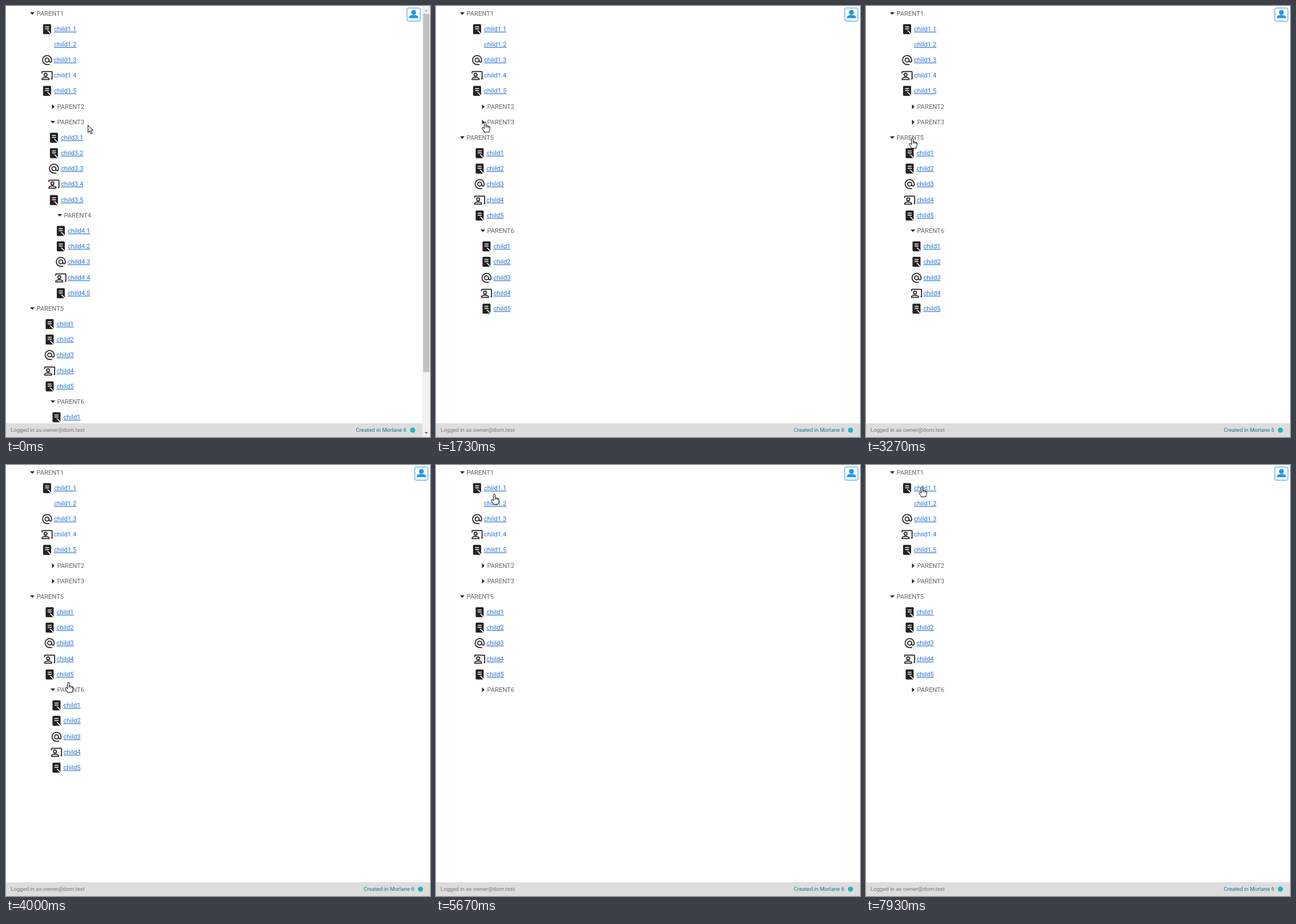
These frames come from a looping animation (742 px wide and 754 px high, 8000 ms). An HTML page:

```html
<!DOCTYPE html>
<html lang="en">
<head>
<meta charset="utf-8">
<title>Collapsible tree</title>
<style>
  html, body { margin: 0; width: 100%; height: 100%; overflow: hidden; background: #fff; }
  svg { display: block; width: 742px; height: 754px; }
  text { font: 11.2px Roboto, Arial, sans-serif; fill: #666; }
  .link { fill: #2a73d2; text-decoration: underline; }
  .plain { text-decoration: none; }
  .small { font-size: 9.6px; fill: #777; }
  .credit { fill: #16788f; }
  .ink { fill: #212121; }
  .line { fill: none; stroke: #212121; stroke-width: 2; }
  .gap { fill: none; stroke: #fff; stroke-width: 1.8; }
  .cursor { fill: #fff; stroke: #000; stroke-width: 1; stroke-linejoin: round; }
</style>
</head>
<body>
<svg viewBox="0 0 742 754" xmlns="http://www.w3.org/2000/svg">
  <defs>
    <g id="page">
      <path class="ink" d="M6 2H18a2 2 0 0 1 2 2V22H6a2 2 0 0 1-2-2V4a2 2 0 0 1 2-2Z"/>
      <path class="gap" d="M8 7.5H16M8 11.5H16M12.5 15.2Q14.5 15.4 15.5 17L20.5 22.5"/>
    </g>
    <g id="at" class="line">
      <circle cx="12" cy="12" r="4"/>
      <path d="M17 21H12A9 9 0 1 1 21 12V13.5A2.5 2.5 0 0 1 16 13.5V12"/>
    </g>
    <g id="present" class="line">
      <path d="M2 8V5A1 1 0 0 1 3 4H21A1 1 0 0 1 22 5V19H20"/>
      <circle cx="9" cy="10.5" r="3"/>
      <path d="M2 20V18.8C2 16.8 6.5 15.8 9 15.8S16 16.8 16 18.8V20Z"/>
    </g>
  </defs>

  <g id="tree"></g>

  <rect y="730" width="742" height="24" fill="#ddd"/>
  <text class="small" x="8" y="745.4">Logged in as owner@dom.test</text>

  <g id="right">
    <rect x="715.4" y="3.5" width="23" height="23" rx="2.5" fill="#fff" stroke="#2196f3"/>
    <circle cx="727" cy="11.3" r="4.2" fill="#2196f3"/>
    <path d="M719 21.2V19.6C719 17.2 723 15.8 727 15.8S735 17.2 735 19.6V21.2Z" fill="#2196f3"/>
    <text class="small credit" x="626" y="745.4">Created in Morlane 6</text>
    <circle cx="725.3" cy="742" r="4.5" fill="#25b3c6"/>
  </g>

  <g id="bar">
    <rect x="728.6" width="13.4" height="754" fill="#f1f1f1"/>
    <rect x="730" y="13.5" width="11" height="627" fill="#c1c1c1"/>
    <path d="M732.5 9L735.3 6 738.1 9Z" fill="#a3a3a3"/>
    <path d="M732.5 745.5L735.3 748.5 738.1 745.5Z" fill="#505050"/>
  </g>

  <path id="arrow" class="cursor" d="M.5.5V13.5L3.4 10.7 5.5 15.6 7.6 14.7 5.5 9.9H9.6Z"/>
  <g id="hand" class="cursor">
    <path d="M-1.5 1.5a1.5 1.5 0 0 1 3 0V6.6q1.5-.8 2.6.4 1.5-.6 2.4.6 1.6-.3 1.7 1.4V12.6q0 1.8-1.2 3.4V17.8H-1.8V16.3L-5.2 11.4q-.7-1.7.6-2.1 1.2-.2 3.1 2.1Z"/>
    <path fill="none" d="M1.5 6.6V9.6M4.1 7V9.8M6.5 7.6V10"/>
  </g>
</svg>
<script>
const LOOP = 8000, FPS = 15, PITCH = 27.18;
const $ = id => document.getElementById(id);
const rows = [];

function addRow(html, inside) {
  const el = document.createElementNS("http://www.w3.org/2000/svg", "g");
  el.innerHTML = html;
  $("tree").append(el);
  const row = { el, inside };
  rows.push(row);
  return row;
}

function parent(id, x, inside = []) {
  const row = addRow(`<path class="ink"/><text x="${x}" y="17">PARENT${id}</text>`, inside);
  row.id = id;
  row.mark = row.el.firstChild;
  row.x = x - 7.4;
}

function children(prefix, x, inside) {
  ["page", "page", "at", "present", "page"].forEach((icon, i) => {
    const name = prefix + (i + 1);
    const use = name === "1.2" ? "" :
      `<use href="#${icon}" transform="translate(${x - 22.6} 3) scale(.875)"/>`;
    const style = name === "1.4" ? "link plain" : "link";
    addRow(`${use}<text class="${style}" x="${x}" y="17">child${name}</text>`, inside);
  });
}

parent(1, 53.4);
children("1.", 84, [1]);
parent(2, 89.4, [1]);
parent(3, 89.4, [1]);
children("3.", 96, [1, 3]);
parent(4, 101.4, [1, 3]);
children("4.", 108, [1, 3, 4]);
parent(5, 53.4);
children("", 88.5, [5]);
parent(6, 89.4, [5]);
children("", 100.5, [5, 6]);

// Times at which each parent toggles; all but PARENT2 begin open.
const toggles = { 1: [6266, 7266], 2: [0], 3: [933], 4: [], 5: [2400, 3266], 6: [4466] };
const isOpen = (id, t) => toggles[id].filter(at => t >= at).length % 2 === 0;

// Pointer waypoints: time, x, y
const path = [
  [0, 143, 208], [467, 87, 201],
  [1667, 87, 201], [1733, 86, 203], [2200, 80.5, 231],
  [3467, 80.5, 231], [4000, 109, 380], [4200, 110, 393],
  [4600, 110, 393], [5000, 105, 202], [5267, 101, 95],
  [5400, 101, 95], [5533, 106, 75], [5867, 97, 15],
  [7867, 97, 15], [7933, 98, 38], [8000, 98, 38]
];

function pointer(t) {
  const i = path.findIndex(p => p[0] > t);
  const [t0, x0, y0] = path[i - 1], [t1, x1, y1] = path[i];
  const k = (t - t0) / (t1 - t0);
  return [Math.round(x0 + (x1 - x0) * k), Math.round(y0 + (y1 - y0) * k)];
}

function show(el, on) { el.style.display = on ? "" : "none"; }

function draw(t) {
  let n = 0;
  for (const row of rows) {
    const visible = row.inside.every(id => isOpen(id, t));
    show(row.el, visible);
    if (!visible) continue;
    row.el.setAttribute("transform", `translate(0 ${Math.floor(n++ * PITCH)})`);
    if (row.mark) row.mark.setAttribute("d", isOpen(row.id, t)
      ? `M${row.x - 4} 11H${row.x + 4}L${row.x} 15.2Z`
      : `M${row.x - 1.5} 9V17.4L${row.x + 2.8} 13.2Z`);
  }
  const overflow = n * PITCH > 730;
  show($("bar"), overflow);
  $("right").setAttribute("transform", `translate(${overflow ? -13.6 : 0} 0)`);

  const [x, y] = pointer(t);
  const linked = x < 138;
  show($("hand"), linked);
  show($("arrow"), !linked);
  $(linked ? "hand" : "arrow").setAttribute("transform", `translate(${x} ${y})`);
}

const start = performance.now();
function tick() {
  const t = (performance.now() - start) % LOOP;
  const step = Math.floor(t * FPS / 1000 + .06) % (LOOP * FPS / 1000);
  draw(step * 1000 / FPS);
  requestAnimationFrame(tick);
}
tick();
</script>
</body>
</html>
```
